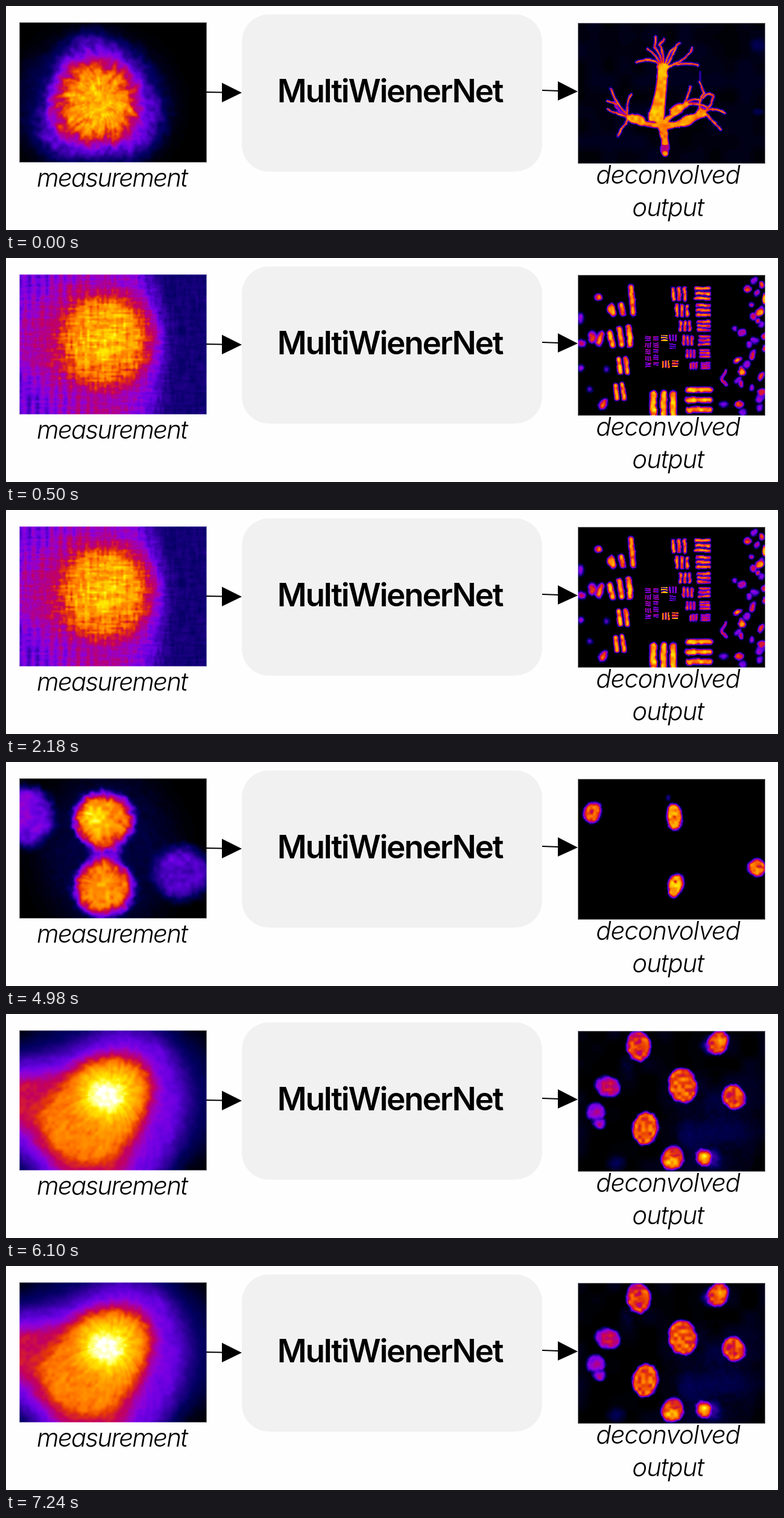
Animation of 1280x372 px, one loop 8 s. Source, as an HTML page with a canvas:

```html
<!DOCTYPE html>
<html lang="en">
<head>
<meta charset="utf-8">
<title>MultiWienerNet</title>
<style>
  html, body { margin: 0; width: 1280px; height: 372px; overflow: hidden; background: #fefefe; }
  svg, canvas { position: absolute; }
  svg { left: 0; top: 0; }
  text { font-family: Inter, "Liberation Sans", sans-serif; font-optical-sizing: none; text-anchor: middle; }
  .title { font-size: 53px; font-weight: 600; letter-spacing: -2.15px; }
  .label { font-size: 42px; font-weight: 300; font-style: italic; letter-spacing: -1.1px; }
  .tight { letter-spacing: -1.75px; }
  canvas { opacity: 0; animation: 8s step-end infinite; }
  .s0 { animation-name: s0; }
  .s1 { animation-name: s1; }
  .s2 { animation-name: s2; }
  .s3 { animation-name: s3; }
  @keyframes s0 { 0% { opacity: 1 } 6.25%, 100% { opacity: 0 } }
  @keyframes s1 { 0% { opacity: 0 } 6.25% { opacity: 1 } 41.25%, 100% { opacity: 0 } }
  @keyframes s2 { 0% { opacity: 0 } 41.25% { opacity: 1 } 76.25%, 100% { opacity: 0 } }
  @keyframes s3 { 0% { opacity: 0 } 76.25%, 100% { opacity: 1 } }
</style>
</head>
<body>
<svg width="1280" height="372" viewBox="0 0 1280 372">
  <rect x="391" y="14" width="498" height="261" rx="45" fill="#f1f1f1"/>
  <path d="M332 143L360 143.5M889 140L917 141" stroke="#000" stroke-width="1.8"/>
  <path d="M358 127.500L391 144L358 160ZM915 125L948 142L915 157Z"/>
  <text class="title" x="636.500" y="159.500">MultiWienerNet</text>
  <text class="label tight" x="175.500" y="300">measurement</text>
  <text class="label" x="1097.500" y="295">deconvolved</text>
  <text class="label" x="1097.500" y="349">output</text>
</svg>
<script>
const LEFT = [22, 27, 311, 233], RIGHT = [948, 28, 311, 234];

// Heat palette: position out of 31, then r, g, b
const STOPS = [
  [0, 0, 0, 0], [1, 0, 0, 61], [2, 1, 0, 96], [6, 98, 0, 220], [7, 122, 0, 227], [8, 146, 0, 210],
  [12, 195, 0, 93], [15, 229, 57, 5], [18, 255, 117, 0], [26, 255, 234, 0], [28, 255, 255, 98], [31, 255, 255, 255]
];
const heat = Array.from({ length: 256 }, (_, i) => {
  const p = i / 255 * 31;
  const k = Math.max(1, STOPS.findIndex(s => s[0] >= p));
  const a = STOPS[k - 1], b = STOPS[k], f = (p - a[0]) / (b[0] - a[0]);
  return [1, 2, 3].map(c => a[c] + (b[c] - a[c]) * f);
});

const clamp = (v, lo, hi) => Math.min(hi, Math.max(lo, v));
const hash = (x, y) => {
  const s = Math.sin(x * 127.1 + y * 311.7) * 43758.5453;
  return s - Math.floor(s);
};
// Smooth value noise in -0.5..0.5
function noise(x, y) {
  const i = Math.floor(x), j = Math.floor(y);
  let u = x - i, v = y - j;
  u *= u * (3 - 2 * u);
  v *= v * (3 - 2 * v);
  const a = hash(i, j), b = hash(i + 1, j), c = hash(i, j + 1), d = hash(i + 1, j + 1);
  return a + (b - a) * u + (c - a + (a - b - c + d) * u) * v - 0.5;
}
// Noise drawn out along rays, fading to nothing at the centre
function rays(x, y, cx, cy, k) {
  const dx = x - cx, dy = y - cy, r = Math.hypot(dx, dy) + 0.01;
  return noise(k * dx / r + r / 16, k * dy / r - r / 18) * clamp((r - 12) / 40, 0, 1);
}

let ctx;
function ink(v, blur) {
  const g = Math.round(v * 255);
  ctx.fillStyle = ctx.strokeStyle = `rgb(${g},${g},${g})`;
  ctx.filter = blur ? `blur(${blur}px)` : 'none';
}
function shape(d, v, blur) {
  ink(v, blur);
  ctx.fill(new Path2D(d));
}
function line(d, w, v, blur) {
  ink(v, blur);
  ctx.lineWidth = w;
  ctx.stroke(new Path2D(d));
}
function blob(x, y, rx, ry, v, blur, turn = 0) {
  ink(v, blur);
  ctx.beginPath();
  ctx.ellipse(x, y, rx, ry, turn, 0, 7);
  ctx.fill();
}
function hole(x, y, rx, ry, v) {
  ctx.globalCompositeOperation = 'darken';
  blob(x, y, rx, ry, v, 1.2);
  ctx.globalCompositeOperation = 'lighten';
}
function cell(x, y, rx, ry, v, turn = 0) {
  blob(x, y, rx + 1, ry + 1, v * 0.45, 1.8, turn);
  blob(x, y, rx - 2, ry - 2, v, 1.4, turn);
}
// Three parallel bars filling a w by h box
function bars(x, y, w, h, upright, v, blur = 0.8) {
  for (let k = 0; k < 3; k++) {
    ink(v, blur);
    if (upright) ctx.fillRect(x + k * w * 0.39, y, w * 0.22, h);
    else ctx.fillRect(x, y + k * h * 0.39, w, h * 0.22);
  }
}

// Paints a brightness field, bends and textures it, then colours it
function panel(scene, [left, top, w, h], mode, warp, draw, texture) {
  const canvas = document.createElement('canvas');
  canvas.className = 's' + scene;
  canvas.width = w;
  canvas.height = h;
  canvas.style.left = left + 'px';
  canvas.style.top = top + 'px';
  document.body.append(canvas);

  ctx = canvas.getContext('2d');
  ctx.fillRect(0, 0, w, h);
  ctx.translate(-left, -top);
  ctx.lineCap = ctx.lineJoin = 'round';
  ctx.globalCompositeOperation = mode;
  draw();

  const from = ctx.getImageData(0, 0, w, h).data;
  const out = ctx.createImageData(w, h);
  for (let y = 0; y < h; y++) for (let x = 0; x < w; x++) {
    const sx = clamp(Math.round(x + warp * noise(x / 8, y / 8)), 0, w - 1);
    const sy = clamp(Math.round(y + warp * noise(x / 8 + 50, y / 8)), 0, h - 1);
    const v = texture(from[(sy * w + sx) * 4] / 255, x + left, y + top);
    const i = (y * w + x) * 4;
    const edge = x === 0 || y === 0 || x === w - 1 || y === h - 1;
    out.data.set(heat[Math.round(clamp(v, 0, 1) * 255)], i);
    out.data[i + 3] = edge ? 128 : 255;
  }
  ctx.putImageData(out, 0, 0);
}

// Scene 0: polyp
panel(0, LEFT, 'lighter', 7, () => {
  blob(145, 165, 125, 110, 0.05, 22);
  shape('M150 48Q205 65 235 125Q258 170 255 205Q235 248 190 250L95 248Q55 235 55 195Q72 150 85 95Q110 50 150 48Z', 0.17, 13);
  shape('M158 84Q200 95 218 140Q230 190 202 214Q160 245 120 228Q72 205 76 160Q78 110 110 94Z', 0.2, 7);
  blob(150, 162, 57, 57, 0.18, 8);
  blob(151, 155, 36, 38, 0.13, 11);
}, (v, x, y) => v * (1 + 0.4 * rays(x, y, 150, 160, 9) + 0.32 * noise(x / 9, y / 9) + 0.16 * noise(x / 4, y / 4)));

panel(0, RIGHT, 'lighten', 2, () => {
  blob(1246, 65, 12, 9, 0.035, 4);
  blob(1247, 176, 9, 5, 0.04, 2);
  const tentacles = [
    'M1087 101Q1075 84 1046 93M1086 100Q1080 82 1064 71M1087 100Q1088 80 1075 69Q1078 60 1077 50',
    'M1089 100Q1092 75 1083 65Q1090 58 1091 54M1092 100Q1098 74 1116 62M1094 100Q1104 88 1111 68',
    'M1095 101Q1125 94 1138 70M1096 102Q1120 92 1148 98',
    'M1034 184Q1018 182 998 172M1032 183Q1012 164 1003 138M1030 182Q1026 163 1037 147M1032 187Q1023 200 1015 215M1012 163L998 158',
    'M1156 178Q1170 186 1185 205M1157 177Q1170 165 1192 178M1156 175Q1173 165 1173 150Q1165 140 1156 154',
    'M1152 174Q1146 160 1158 145L1149 126M1126 163Q1130 150 1135 134M1126 164Q1146 160 1162 168M1126 163Q1140 152 1152 158'
  ];
  tentacles.forEach(d => line(d, 5, 0.2, 1));
  tentacles.forEach(d => line(d, 2.6, 0.52, 0.5));
  line('M1151 124L1151 109', 2, 0.2, 0.8);
  line('M1034 184Q1018 182 1008 160', 4, 0.36, 1);
  shape('M1081 102L1097 102Q1096 130 1093 160Q1092 182 1090 193L1066 191Q1063 180 1071 165Q1080 135 1081 102Z', 0.66, 1.2);
  blob(1089, 101, 10, 6, 0.68, 1.2);
  blob(1078, 180, 8, 9, 0.78, 4);
  shape('M1076 188L1099 190Q1094 205 1099 230L1086 232Q1087 210 1076 188Z', 0.6, 1.2);
  blob(1092, 237, 7, 11, 0.34, 1.3);
  blob(1093, 245, 4.500, 4.500, 0.66, 1);
  line('M1084 198Q1062 199 1032 185', 8, 0.6, 1.2);
  blob(1046, 188, 14, 8, 0.68, 1.5, 0.25);
  line('M1092 200Q1125 196 1154 178', 10, 0.6, 1.2);
  blob(1130, 190, 14, 8, 0.68, 1.5, -0.5);
  blob(1153, 177, 8, 8, 0.68, 1.5);
  line('M1092 192Q1106 178 1128 164', 8, 0.6, 1.2);
  blob(1113, 172, 13, 8, 0.68, 1.5, -0.6);
}, (v, x, y) => v * (1 + 0.3 * noise(x / 6, y / 6)) + 0.01 + 0.016 * noise(x / 25, y / 25));

// Scene 1: resolution chart
panel(1, LEFT, 'lighter', 4, () => {
  blob(180, 140, 260, 240, 0.085, 10);
  shape('M0 0L225 0Q262 80 262 145Q260 210 240 300L0 300Z', 0.12, 14);
  blob(115, 135, 130, 70, 0.1, 22);
  blob(150, 150, 85, 170, 0.09, 18);
  blob(170, 138, 76, 78, 0.18, 12);
  blob(162, 132, 54, 52, 0.17, 18);
}, (v, x, y) => {
  const spikes = Math.cos(x * 0.42) * Math.abs(y - 140) / 120 * clamp((190 - x) / 100, 0, 1);
  const weave = 0.26 * noise(x / 4, y / 18) + 0.26 * noise(x / 18, y / 3.5) + 0.16 * noise(x / 4, y / 4);
  return v * (1 + weave + 0.2 * spikes);
});

panel(1, RIGHT, 'lighten', 1.8, () => {
  // Large bars on the left
  line('M1005 80L1007 92M1020 78L1023 92M1036 48L1040 92', 8, 0.6, 1.4);
  line('M1001 124L1006 145M1017 118L1021 144M1032 114L1035 144', 8, 0.66, 1.4);
  line('M1016 168L1019 190M1027 167L1030 190', 7, 0.66, 1.3);
  line('M1011 212L1013 234M1022 210L1025 233', 7, 0.62, 1.3);
  // Large bars at the foot
  line('M1073 225L1073 262M1090 225L1090 262M1106 225L1106 262', 10, 0.7, 1.4);
  line('M1131 219L1167 219M1131 236L1167 236M1131 252L1167 252', 8, 0.68, 1.4);
  // Two shrinking middle columns
  for (let k = 0; k < 6; k++) {
    const s = 1 - k * 0.1, y = 48 + k * 30 - k * k;
    bars(1104 + k * 6, y, 24 * s, 23 * s, true, 0.6);
    bars(1142 + k * 2, y, 26 * (1 - k * 0.08), 22 * s, false, 0.62);
  }
  // Fine centre
  for (let k = 0; k < 5; k++) {
    bars(1060, 130 + k * 11, 9, 8, k % 2 > 0, 0.3, 0.5);
    bars(1073, 130 + k * 10.500, 9, 7, false, 0.34, 0.5);
  }
  bars(1086, 128, 11, 10, false, 0.68, 0.6);
  bars(1100, 127, 12, 11, true, 0.28, 0.6);
  bars(1100, 142, 11, 9, false, 0.22, 0.6);
  bars(1088, 171, 12, 11, true, 0.6, 0.6);
  bars(1104, 170, 11, 11, false, 0.64, 0.6);
  // Stray blobs on both sides
  blob(982, 65, 6, 5, 0.5, 1.5);
  blob(1002, 85, 5, 7, 0.55, 1.5);
  blob(972, 131, 6, 9, 0.55, 2);
  blob(985, 134, 5, 12, 0.6, 2, 0.3);
  blob(952, 100, 5, 9, 0.25, 2);
  blob(954, 142, 7, 6, 0.35, 2);
  blob(953, 183, 4, 5, 0.3, 2);
  blob(990, 243, 5, 9, 0.62, 2, 0.4);
  blob(968, 218, 4, 4, 0.2, 2);
  blob(996, 185, 4, 4, 0.2, 2);
  line('M1194 187L1186 201L1194 211', 4, 0.4, 1);
  for (let k = 0; k < 34; k++) {
    const a = hash(k, 3), b = hash(k, 9);
    blob(1258 - 50 * a * a, 38 + 6.600 * k, 3 + 5 * b, 3 + 5 * hash(k, 5), 0.16 + 0.48 * hash(k, 7), 1.8, b * 3);
  }
  blob(1190, 243, 7, 4, 0.25, 2);
}, (v, x, y) => v * (1 + 0.5 * noise(x / 6, y / 6)));

// Scene 2: four beads
panel(2, LEFT, 'lighter', 6, () => {
  blob(170, 150, 110, 130, 0.03, 25);
  blob(30, 90, 46, 48, 0.22, 8);
  blob(292, 184, 45, 42, 0.17, 8);
  blob(163, 97, 53, 51, 0.2, 4);
  blob(163, 209, 53, 52, 0.2, 4);
  blob(165, 152, 28, 18, 0.14, 6);
  for (const y of [97, 209]) {
    blob(162, y, 45, 43, 0.2, 4);
    blob(161, y, 39, 37, 0.15, 6);
  }
  blob(148, 93, 24, 24, 0.25, 10);
  blob(155, 212, 26, 22, 0.1, 10);
}, (v, x, y) => v * (1 + 0.35 * rays(x, y, 160, y < 152 ? 97 : 209, 8) + 0.28 * noise(x / 7, y / 7)));

panel(2, RIGHT, 'lighten', 3, () => {
  cell(973, 84, 14, 18, 0.54, 0.4);
  cell(1108, 91, 12, 22, 0.66, -0.1);
  cell(1110, 205, 12, 19, 0.72, 0.25);
  cell(1245, 175, 14, 14, 0.62);
  blob(1098, 59, 3, 5, 0.11, 1.5);
  hole(971, 83, 3, 4, 0.38);
  hole(1108, 92, 3, 3, 0.48);
  hole(1110, 198, 3, 3, 0.42);
  hole(1249, 175, 5, 2, 0.4);
}, (v, x, y) => v * (1 + 0.35 * noise(x / 5, y / 5)));

// Scene 3: nuclei
panel(3, LEFT, 'lighter', 4, () => {
  blob(170, 140, 190, 140, 0.06, 20);
  shape('M-20 75Q80 80 125 50Q200 0 265 50Q315 130 290 190L245 300L75 300L-20 205Z', 0.17, 18);
  shape('M-20 100Q70 115 110 88Q150 58 205 65Q252 85 247 135Q235 190 190 275L100 275Q65 235 20 178L-20 165Z', 0.19, 10);
  shape('M108 108Q140 74 190 77Q238 88 235 130Q225 180 195 212Q170 252 130 248Q80 235 60 190Q50 160 80 140Z', 0.19, 9);
  blob(170, 137, 50, 48, 0.2, 17);
  blob(166, 135, 30, 28, 0.22, 12);
}, (v, x, y) => v * (1 + 0.14 * rays(x, y, 167, 135, 12) + 0.1 * noise(x / 6, y / 6)));

panel(3, RIGHT, 'lighten', 3, () => {
  blob(1180, 190, 60, 70, 0.03, 25);
  blob(1030, 85, 10, 18, 0.04, 7);
  blob(1012, 248, 14, 8, 0.06, 6);
  blob(1130, 200, 14, 20, 0.05, 7);
  blob(1172, 240, 12, 14, 0.12, 4);
  blob(1166, 52, 9, 12, 0.16, 4);
  cell(1049, 54, 20, 25, 0.49, -0.15);
  cell(1181, 48, 17, 20, 0.48, 0.5);
  blob(1187, 46, 8, 6, 0.68, 2.500, -0.5);
  cell(1122, 119, 23, 29, 0.55, -0.2);
  cell(998, 121, 21, 17, 0.32, 0.3);
  blob(1001, 121, 10, 8, 0.42, 3);
  cell(978, 162, 15, 16, 0.24);
  cell(984, 182, 11, 9, 0.25);
  cell(1207, 138, 18, 21, 0.51, -0.4);
  blob(978, 163, 5, 5, 0.36, 2);
  blob(983, 183, 4, 4, 0.36, 2);
  cell(1060, 190, 21, 27, 0.54, 0.25);
  cell(1105, 239, 18, 21, 0.51, 0.4);
  blob(1103, 247, 11, 7, 0.68, 2);
  cell(1157, 238, 13, 14, 0.55);
  blob(1156, 238, 6, 6, 0.8, 2.500);
  hole(1051, 46, 4, 5, 0.37);
  hole(1050, 65, 5, 5, 0.36);
  hole(1199, 134, 5, 6, 0.38);
  hole(1210, 146, 4, 4, 0.4);
  hole(1107, 235, 12, 2.500, 0.42);
}, (v, x, y) => v * (1 + 0.45 * noise(x / 6, y / 6)) + 0.004 + 0.025 * noise(x / 28, y / 28));
</script>
</body>
</html>
```
